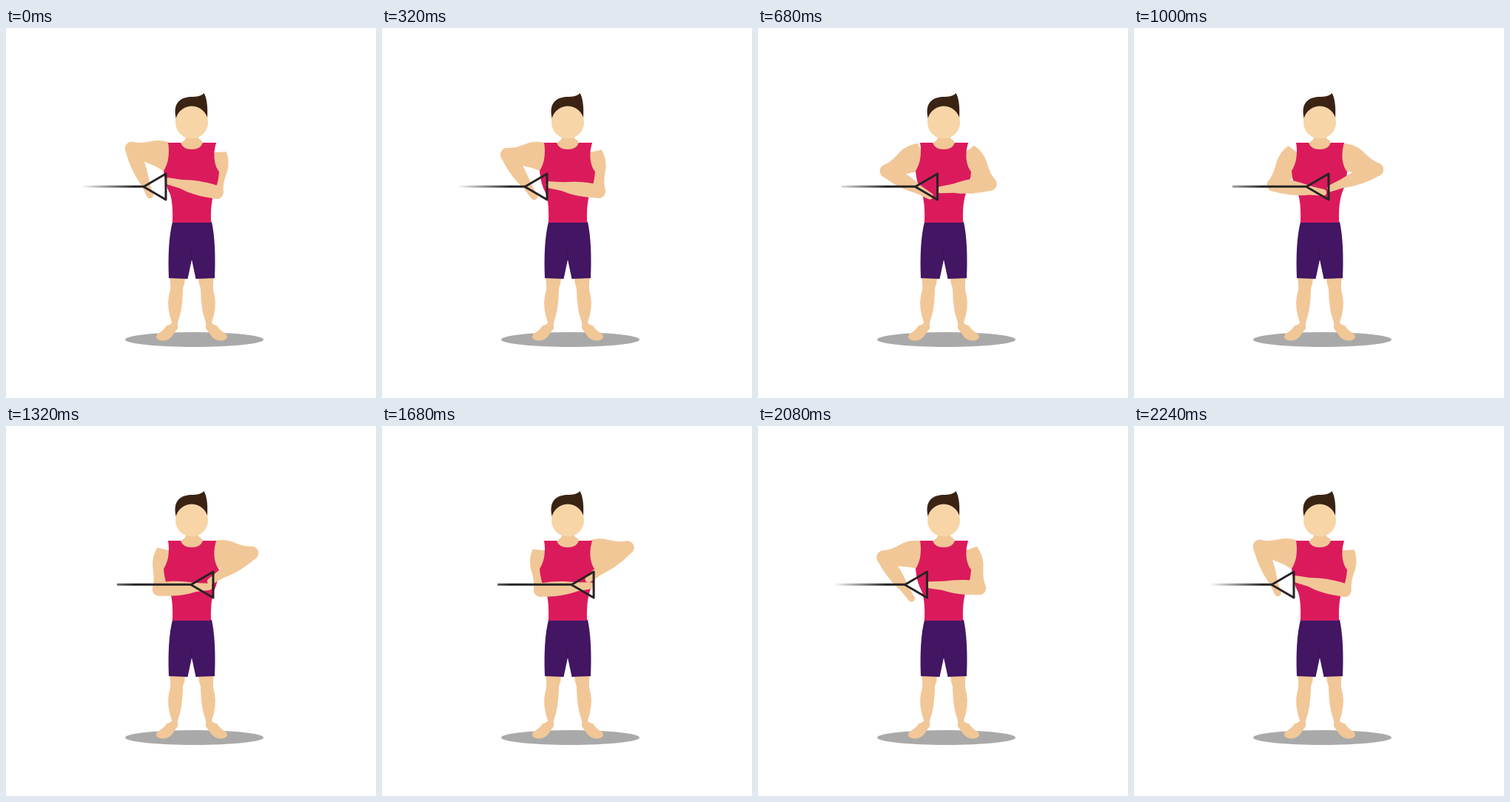
Recreate the animation shown at these times as an HTML page. Size 500 px wide and 500 px high, loop 3000 ms.

```html
<!DOCTYPE html>
<html lang="en">
<head>
<meta charset="utf-8">
<title>Cable twist</title>
<style>
html, body { margin: 0; width: 100%; height: 100%; overflow: hidden; background: #fff; }
svg { display: block; width: 100%; height: 100%; }
.skin { fill: #f1c797; }
.cable { fill: none; stroke: #272325; stroke-width: 3; stroke-linejoin: round; }
</style>
</head>
<body>
<svg viewBox="0 0 500 500">
  <defs>
    <linearGradient id="fade" gradientUnits="userSpaceOnUse" x1="102" y1="0" x2="174" y2="0">
      <stop stop-color="#272325" stop-opacity="0"/>
      <stop offset="1" stop-color="#272325"/>
    </linearGradient>
    <path id="leg" d="M221 337H242Q242 345 239 352Q239 380 232 398V406Q228 411 224 417Q218 424 208 422Q201 420 204 414Q214 408 217 402Q223 401 224 398Q217 378 220 362Q224 350 221 337Z"/>
    <path id="upper" d="M-4 -16Q9 -20 22 -16C34 -11 40 -9 50 -9A9 9 0 0 1 53 8.5L27 15Q14 17 2 22L-4 20Z"/>
    <path id="fore" d="M0 -9C20 -11 35 -9 50 -6L68 -4.5Q72 -4 72 0Q72 4 68 4.5L50 6C35 10 20 11 0 9A9 9 0 0 1 0 -9Z"/>
  </defs>
  <ellipse cx="254.5" cy="421" rx="93.5" ry="10" fill="#a9a9a9"/>
  <g class="skin">
    <use href="#leg"/>
    <use href="#leg" transform="translate(502) scale(-1 1)"/>
    <use href="#upper" id="upperL"/>
    <use href="#upper" id="upperR"/>
  </g>
  <path fill="#421663" d="M225 262H278Q284 290 282 338L256.500 339L251 313L245.500 339L220 338Q218 290 225 262Z"/>
  <path stroke="#35104f" stroke-width=".6" d="M251 295V314"/>
  <path fill="#db1a5c" d="M219 155H284Q280 168 282 180Q284 190 288 194Q287 210 281 223Q276 238 277 263H225Q226 238 222 225Q214 210 213 193Q217 187 219 178Q221 165 219 155Z"/>
  <path class="skin" d="M243 145H260V149Q265 152 266 155Q263 164 251 164Q239 164 236 155Q242 152 243 149Z"/>
  <path fill="#3b2314" d="M230 123C226 107 230 94 250 93C258 93 264 92 267.500 88C271 94 273 104 272 123Z"/>
  <circle cx="251" cy="127.500" r="22" fill="#f7d5a7"/>
  <g class="skin">
    <use href="#fore" id="foreL"/>
    <use href="#fore" id="foreR"/>
  </g>
  <path id="rope" class="cable" style="stroke:url(#fade)"/>
  <path id="handle" class="cable" d="M186 214.500L216 197V232Z"/>
</svg>
<script>
const LOOP = 3000, STEP = 40, TURN = 1640, END = 2240;
const $ = id => document.getElementById(id);
const smooth = u => u * u * (3 - 2 * u);

// side: -1 or 1; angles in degrees below the outward / inward horizontal
function poseArm(name, side, x, y, upper, fore) {
  const a = upper * Math.PI / 180;
  const ex = x + side * 50 * Math.cos(a), ey = y + 50 * Math.sin(a);
  $('upper' + name).setAttribute('transform', `translate(${x} ${y}) scale(${side} 1) rotate(${upper})`);
  $('fore' + name).setAttribute('transform', `translate(${ex} ${ey}) scale(${-side} 1) rotate(${fore})`);
}

function draw(now) {
  const t = Math.floor(now % LOOP / STEP) * STEP;
  const out = t <= TURN;
  const p = out ? smooth(t / TURN) : 1 - smooth(Math.min(1, (t - TURN) / (END - TURN)));
  // the near forearm follows the handle out, but swings straight back
  const foreL = out ? 68.7 - 121 * p + 46.3 * p * p : 68.7 - 74.7 * p;
  poseArm('L', -1, 219, 172, -10.6 + 96 * p, foreL);
  poseArm('R', 1, 282, 172, 87 - 97 * p, -12.9 + 52.8 * p);
  const d = 71 * p;
  $('handle').setAttribute('transform', `translate(${d})`);
  // slight slope keeps the gradient's bounding box non-empty
  $('rope').setAttribute('d', `M${86 + d} 214.300L${186 + d} 214.310`);
  requestAnimationFrame(draw);
}
draw(0);
</script>
</body>
</html>
```
